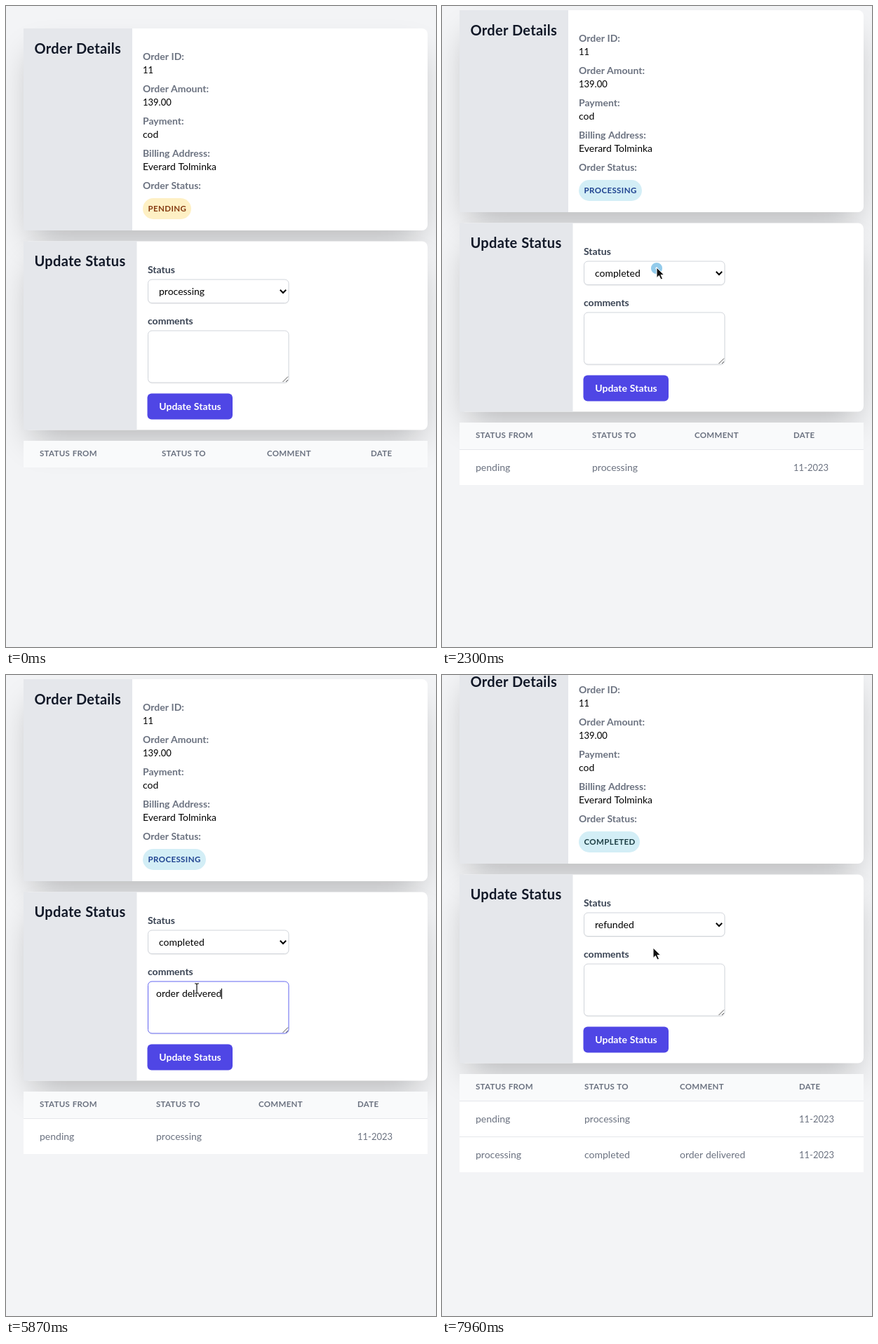
An HTML page for the animation above (8000 ms loop, 613x914 px).

```html
<!DOCTYPE html>
<html lang="en">
<head>
<meta charset="utf-8">
<title>Order status</title>
<style>
  html, body { margin: 0; width: 100%; height: 100%; overflow: hidden; background: #f3f4f6; }
  svg { display: block; font: 14px Lato, "Open Sans", sans-serif; word-spacing: .5px; }
  text { white-space: pre; }
  .head { font-size: 20px; font-weight: 700; letter-spacing: .3px; fill: #111827; }
  .label { font-weight: 700; fill: #6b7280; }
  .field { font-weight: 700; fill: #374151; }
  .value { fill: #000; }
  .cell { fill: #6b7280; }
  .num { font-size: 13px; }
  .caps { font-size: 11.5px; letter-spacing: .3px; font-weight: 700; fill: #6b7280; }
  .badge { font-size: 11.5px; letter-spacing: .4px; font-weight: 700; }
  .button { font-weight: 700; fill: #fff; }
</style>
</head>
<body>
<svg width="613" height="914" viewBox="0 0 613 914">
  <defs>
    <filter id="blur" filterUnits="userSpaceOnUse" x="-80" y="-80" width="780" height="900">
      <feGaussianBlur stdDeviation="25"/>
    </filter>
  </defs>
  <g id="page">
    <g id="cards"></g>
    <g id="content"></g>
  </g>
  <g id="pointer"></g>
</svg>
<script>
const LOOP = 8000;
const $ = id => document.getElementById(id);
const text = (x, y, s, cls, extra = '') => `<text x="${x}" y="${y}" class="${cls}" ${extra}>${s}</text>`;
const rect = (x, y, w, h, fill, rx = 0, extra = '') =>
  `<rect x="${x}" y="${y}" width="${w}" height="${h}" rx="${rx}" fill="${fill}" ${extra}/>`;

// What the page shows after each reload
const stages = [
  { from: 0, scroll: 0, cols: [48, 222, 372, 520], next: 'processing', rows: [],
    badge: ['PENDING', 69, '#fef0c4', '#853a10'] },
  { from: 1290, scroll: -26, cols: [48, 214, 360, 501], next: 'completed',
    rows: [['pending', 'processing', '', '11-2023']],
    badge: ['PROCESSING', 90, '#d3eef6', '#1e4290'] },
  { from: 7040, scroll: -51, cols: [48, 203, 339, 509], next: 'refunded',
    rows: [['pending', 'processing', '', '11-2023'], ['processing', 'completed', 'order delivered', '11-2023']],
    badge: ['COMPLETED', 87, '#d3eef6', '#1d3f45'] },
];

// Pointer path: time, x, y
const path = [
  [500, 416, 427], [870, 278, 572], [1290, 278, 572], [1340, 282, 565], [1900, 302, 425],
  [2230, 306, 373], [2330, 306, 373], [2700, 292, 399], [2810, 286, 407], [3260, 286, 407],
  [3500, 272, 447], [6250, 272, 447], [6800, 259, 537], [7060, 259, 537], [7640, 392, 496],
  [7780, 392, 496], [7960, 301, 389],
];
const clicks = [[1080, 278, 572], [2250, 306, 374], [3510, 273, 446], [6860, 260, 538]];
const comment = 'order delivered';
const keys = [4170, 4220, 4390, 4570, 4710, 4770, 4930, 5080, 5180, 5340, 5410, 5480, 5540, 5710, 5870];

function pointerAt(t) {
  const i = path.findIndex(p => p[0] > t);
  if (i === 0) return null;
  if (i < 0) return path[path.length - 1].slice(1);
  const [t0, x0, y0] = path[i - 1], [t1, x1, y1] = path[i];
  const k = (t - t0) / (t1 - t0);
  return [x0 + (x1 - x0) * k, y0 + (y1 - y0) * k];
}

const inside = (p, x, y, w, h) => p && p[0] >= x && p[0] <= x + w && p[1] >= y && p[1] <= y + h;

function card(y, h, side, title) {
  return rect(37, y + 37, 552, h - 24, '#000', 0, 'opacity=".25" filter="url(#blur)"') +
    rect(25, y, 576, h, '#fff', 8) + rect(25, y, side, h, '#e5e7eb') +
    text(40.5, y + 35.5, title, 'head');
}

function box(y, h, active) {
  return rect(202, y + 1, 201.5, h, '#000', 6, 'opacity=".05"') +
    rect(202.5, y + .5, 200.5, h - 1, '#fff', 5.5, `stroke="${active ? '#6366f1' : '#d1d5db'}"`);
}

function details(stage) {
  const [label, width, back, ink] = stage.badge;
  const pairs = [['Order ID:', '11'], ['Order Amount:', '139.00'], ['Payment:', 'cod'],
    ['Billing Address:', 'Everard Tolminka'], ['Order Status:', '']];
  return pairs.map(([name, value], i) =>
    text(195, 77 + 46 * i, name, 'label') +
    text(195, 96 + 46 * i, value, /\d/.test(value) ? 'value num' : 'value')).join('') +
    rect(195, 274, width, 30, back, 15) + text(202.5, 292.5, label, 'badge', `fill="${ink}"`);
}

function form(t, stage, hover) {
  const selectOn = t >= 2340 && t < 3510, areaOn = t >= 3510 && t < 6860;
  const pressed = t >= 6860 && t < 7040;
  const typed = t < 7040 ? comment.slice(0, keys.filter(k => k <= t).length) : '';
  const caret = areaOn && !(t >= 4020 && t < 4170) && t < 6370;
  return text(202, 381, 'Status', 'field') +
    (t >= 2340 && t < 2600 ? rect(200.5, 388, 204.5, 38, 'none', 8, 'stroke="#c7d2fe" stroke-width="3"') : '') +
    box(389.5, 34.5, selectOn) + text(218, 411.5, stage.next, 'value') +
    '<path d="M390.8 404.8l4.2 4.2 4.2-4.2" fill="none" stroke="#000" stroke-width="2"/>' +
    text(202, 454, 'comments', 'field') + box(462.5, 75, areaOn) +
    '<path d="M394.5 536l7.5-7.5M399 536l3-3" stroke="#555"/>' +
    text(214, 485, typed, 'value', 'id="typed"') +
    (caret ? '<path id="caret" d="M.5 473v15" stroke="#000"/>' : '') +
    (pressed ? rect(199, 550, 126.5, 42, '#fff', 8, 'stroke="#5b55dc" stroke-width="2"') : '') +
    rect(201.5, 552.5, 121.5, 37, hover || pressed ? '#5200ff' : '#4f46e5', 6) +
    text(262.5, 576, 'Update Status', 'button', 'text-anchor="middle"');
}

function table({ cols, rows }) {
  const line = (cells, y, cls) => cells.map((s, i) =>
    text(cols[i], y, s, cls + (/\d/.test(s) ? ' num' : ''))).join('');
  return rect(25, 620, 576, 38, '#f9fafb') +
    line(['STATUS FROM', 'STATUS TO', 'COMMENT', 'DATE'], 642, 'caps') +
    rows.map((cells, i) => {
      const y = 658 + 51 * i;
      return rect(25, y, 576, 51, '#fff') + rect(25, y, 576, 1, '#e5e7eb') + line(cells, y + 31, 'cell');
    }).join('');
}

function ripple(t) {
  return clicks.map(([start, x, y]) => {
    const p = (t - start) / 320;
    if (p < 0 || p >= 1) return '';
    const outer = 10.6 - 5 * (1 - p) ** 4, inner = Math.min(10.4 * p, outer);
    return `<circle cx="${x}" cy="${y}" r="${(outer + inner) / 2}" fill="#2a98d8" fill-opacity=".12"
      stroke="#2a98d8" stroke-width="${outer - inner}" opacity="${.5 + .3 * p ** 3}"/>`;
  }).join('');
}

function cursor([x, y], beam) {
  const bar = 'd="M-3-7h2l1 1 1-1h2M0-6V6M-3 7h2l1-1 1 1h2" fill="none"';
  const shape = beam
    ? `<path ${bar} stroke="#fff" stroke-width="3"/><path ${bar} stroke="#111" stroke-width="1.2"/>`
    : '<path d="M0 0V14.5L3.4 11.4 6 17 8.5 15.8 6 10.4H10.6z" fill="#111" stroke="#fff"/>';
  return `<g transform="translate(${x} ${y})">${shape}</g>`;
}

$('cards').innerHTML = card(32, 288, 155, 'Order Details') + card(335.5, 269, 161.5, 'Update Status');
let shown = '';

function frame(now) {
  const t = now % LOOP;
  const stage = stages.filter(s => s.from <= t).pop();
  const { scroll } = stage;
  const p = pointerAt(t);
  const html = details(stage) + form(t, stage, inside(p, 202, 553 + scroll, 121, 36)) + table(stage);
  if (html !== shown) {
    $('content').innerHTML = shown = html;
    const caret = $('caret');
    if (caret) {
      const end = $('typed').textContent ? $('typed').getComputedTextLength() : 0;
      caret.setAttribute('transform', `translate(${214 + Math.round(end)} 0)`);
    }
  }
  $('page').setAttribute('transform', `translate(0 ${scroll})`);
  $('pointer').innerHTML = ripple(t) + (p ? cursor(p, inside(p, 202, 462 + scroll, 201, 75)) : '');
  requestAnimationFrame(frame);
}
frame(performance.now());
</script>
</body>
</html>
```
